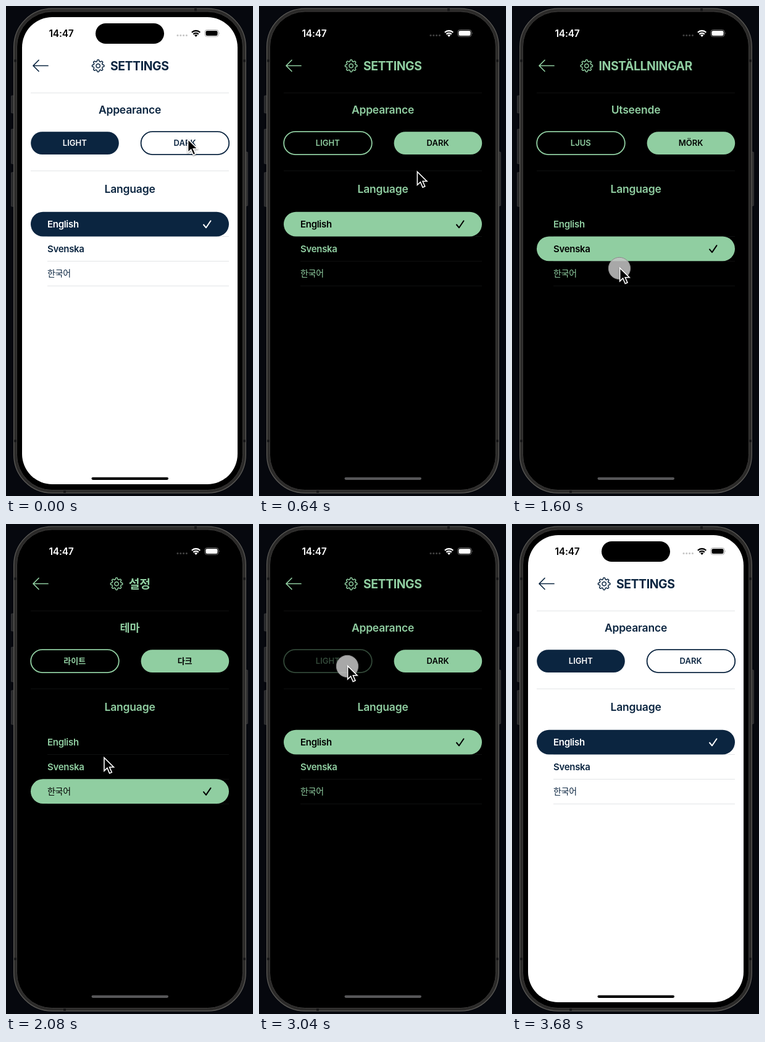
An HTML page that plays this animation: 400 by 792 pixels, repeating every 3.76 s.

```html
<!DOCTYPE html>
<html lang="en">
<head>
<meta charset="utf-8">
<title>Settings</title>
<style>
html, body { margin: 0; width: 100%; height: 100%; overflow: hidden; background: #06080e; }
svg { display: block; width: 400px; height: 792px; }
text { font: 600 15px Inter, "Noto Sans CJK KR", "Noto Sans CJK", sans-serif; fill: var(--fg); }
.light { --fg: #0b2540; --bg: #fff; --on: #fff; --line: #e3e5e7; --bar: #000; --dots: #c6c6c6; --rim: #a6a6a6; }
.dark { --fg: #90cea1; --bg: #000; --on: #000; --line: #0f1010; --bar: #565658; --dots: #414141; --rim: #707070; }
.status { --ink: #000; fill: var(--ink); }
.dark .status { --ink: #fff; }
.status text { fill: var(--ink); font-size: 15.5px; letter-spacing: -.2px; }
.icon { fill: none; stroke: var(--fg); stroke-linecap: round; stroke-linejoin: round; }
.lines { stroke: var(--line); }
.mid { text-anchor: middle; font-size: 17.5px; letter-spacing: -.2px; }
#title { font-size: 19.4px; font-weight: 700; letter-spacing: -.4px; }
.btn rect { fill: none; stroke: var(--fg); stroke-width: 1.8; }
.btn text { text-anchor: middle; font-size: 13px; }
.btn.on rect { fill: var(--fg); stroke: none; }
.btn.on text, .row.on { fill: var(--on); }
.row { letter-spacing: -.3px; }
.row:lang(ko) { font-size: 14px; font-weight: 500; }
</style>
</head>
<body>
<svg viewBox="0 0 400 792">
  <g fill="#2a2a2b" stroke="#404042" stroke-width=".7">
    <rect x="8.5" y="145" width="6" height="28" rx="1"/>
    <rect x="8.5" y="199" width="6" height="56" rx="1"/>
    <rect x="8.5" y="269" width="6" height="55" rx="1"/>
    <rect x="386" y="236" width="5.5" height="87" rx="1"/>
  </g>
  <rect x="12.7" y="4.2" width="375.6" height="783" rx="62" fill="#2b2a29" stroke="#5b5a57" stroke-width="1.3"/>
  <path d="M13 88.5h5M383 88.5h5M13 703h5M383 703h5M307 4v5M95 782v5" stroke="#171718" stroke-width="4"/>
  <rect x="17.5" y="9" width="366" height="773.5" rx="57" stroke="#3c3b3a"/>

  <g id="app" class="light">
    <rect x="26" y="18" width="349" height="755" rx="49" fill="var(--bg)"/>
    <rect x="145" y="28" width="111" height="33" rx="16.5"/>
    <g class="status">
      <text x="69.5" y="49.5">14:47</text>
      <path d="M278 47.5h14.5" fill="none" stroke="var(--dots)" stroke-width="3.2" stroke-linecap="round" stroke-dasharray="0 4.8"/>
      <path d="M300.9 42.7a9.6 9.6 0 0 1 13.4 0M303.4 45.6a6 6 0 0 1 8.4 0" fill="none" stroke="var(--ink)" stroke-width="2.3"/>
      <path d="M307.6 50l-2.5-2.7a3.6 3.6 0 0 1 5 0z"/>
      <rect x="322" y="38.5" width="22" height="11" rx="3.6" fill="none" stroke="var(--rim)"/>
      <rect x="323.5" y="40" width="19" height="8" rx="2.3"/>
      <path d="M345.3 42.3q1.4 1.7 0 3.4z" fill="var(--rim)"/>
    </g>
    <path class="icon" stroke-width="1.7" d="M68 96.5H44M53 87.5l-9 9 9 9"/>
    <g id="gear" class="icon" stroke-width="1.5"><path/><circle r="3.2"/></g>
    <text id="title" class="mid" x="216.2" y="104"></text>
    <path class="lines" d="M40 140.5H361M40 266.5H361M67 372.5H361M67 412.5H361M67 452.5H361"/>
    <text id="look" class="mid" x="200.5" y="173.7"></text>
    <g id="day" class="btn">
      <rect x="40.2" y="203.2" width="142.6" height="36.9" rx="18.4"/>
      <text x="111.3" y="226.3"></text>
    </g>
    <g id="night" class="btn">
      <rect x="218.6" y="203.2" width="142.6" height="36.9" rx="18.4"/>
      <text x="289.6" y="226.3"></text>
    </g>
    <text class="mid" x="200.5" y="301.7">Language</text>
    <g id="pick">
      <rect x="40" y="332.7" width="321" height="39.8" rx="19.9" fill="var(--fg)"/>
      <path class="icon" style="stroke:var(--on)" stroke-width="2" d="M320 353.5l4 4.8 7.5-11"/>
    </g>
    <text class="row" x="67" y="358">English</text>
    <text class="row" x="67" y="398">Svenska</text>
    <text class="row" x="67" y="437" lang="ko">한국어</text>
    <rect x="138.5" y="761.7" width="124.5" height="4.3" rx="2.15" fill="var(--bar)"/>
  </g>

  <g id="mouse">
    <circle id="tap" cy="2" r="17.7" fill="#c4c4c4" fill-opacity=".86" stroke="#8c8c8c"/>
    <path d="M.6 1.4V22.8L5.6 18.1 9.3 26.7 13 25.1 9.3 16.8H16.1Z" stroke="#fff" stroke-width="1.6" style="filter:drop-shadow(0 1px 1px #0007)"/>
  </g>
</svg>
<script>
const LOOP = 3760, STEP = 80;
const DARK = 320, SWEDISH = 960, KOREAN = 1680, ENGLISH = 2320, LIGHT = 3120;
const $ = id => document.getElementById(id);
const rows = document.querySelectorAll('.row');

const words = [
  { title: 'SETTINGS', look: 'Appearance', day: 'LIGHT', night: 'DARK' },
  { title: 'INSTÄLLNINGAR', look: 'Utseende', day: 'LJUS', night: 'MÖRK' },
  { title: '설정', look: '테마', day: '라이트', night: '다크' }
];

// Pointer moves: departure, arrival, place
const moves = [
  [480, 720, 208, 332],
  [800, 880, 174, 378],
  [1040, 1200, 174, 413],
  [1360, 1520, 174, 422],
  [1760, 2160, 149.5, 350.5],
  [2400, 2560, 174, 273],
  [2560, 2720, 143, 228],
  [3520, 3600, 318, 370]
];

const within = (t, a, b) => t >= a && t < b;
const clamp = (v, lo, hi) => Math.max(lo, Math.min(hi, v));
const theme = dark => dark ? 'dark' : 'light';

function pointer(t) {
  let x = 294, y = 214;
  for (const [from, to, nx, ny] of moves) {
    const p = clamp((t - from) / (to - from), 0, 1) ** 2;
    x += (nx - x) * p;
    y += (ny - y) * p;
  }
  return `translate(${x} ${y})`;
}

// Quick dip on press, slower return
function fade(t, low) {
  const d = t - low;
  return Math.min(1, .2 + .8 * Math.abs(d) / (d < 0 ? 160 : 320));
}

function gearPath() {
  const pts = [];
  for (let i = 0; i < 128; i++) {
    const a = i / 64 * Math.PI;
    const r = 8.5 + 1.2 * clamp(1.7 * Math.cos(8 * a), -1, 1);
    pts.push((r * Math.sin(a)).toFixed(2) + ' ' + (-r * Math.cos(a)).toFixed(2));
  }
  return 'M' + pts.join('L') + 'Z';
}

function button(id, label, dark, on, opacity) {
  const g = $(id);
  g.setAttribute('class', `btn ${theme(dark)}${on ? ' on' : ''}`);
  g.setAttribute('opacity', opacity);
  g.lastElementChild.textContent = label;
}

function draw(now) {
  const t = Math.floor(now % LOOP / STEP) * STEP;
  const lang = within(t, SWEDISH, KOREAN) ? 1 : within(t, KOREAN, ENGLISH) ? 2 : 0;
  const w = words[lang];

  $('app').setAttribute('class', theme(within(t, DARK, LIGHT)));
  $('title').textContent = w.title;
  $('look').textContent = w.look;
  const gearX = 196.5 - $('title').getComputedTextLength() / 2;
  $('gear').setAttribute('transform', `translate(${gearX} 96.7)`);

  // A pressed button takes its new style one step late
  const dayOut = within(t, DARK, LIGHT + STEP);
  const nightOn = within(t, DARK + STEP, LIGHT);
  button('day', w.day, dayOut, !dayOut, fade(t, LIGHT - 50));
  button('night', w.night, nightOn, nightOn, fade(t, DARK));

  $('pick').setAttribute('transform', `translate(0 ${lang * 39.8})`);
  rows.forEach((r, i) => r.classList.toggle('on', i === lang));

  const tapped = [DARK, SWEDISH, KOREAN, ENGLISH, LIGHT].includes(t + STEP);
  $('mouse').setAttribute('transform', pointer(t));
  $('mouse').style.display = t < LOOP - STEP ? '' : 'none';
  $('tap').style.display = tapped ? '' : 'none';
}

$('gear').firstElementChild.setAttribute('d', gearPath());
const start = performance.now();
(function tick() {
  draw(performance.now() - start);
  requestAnimationFrame(tick);
})();
</script>
</body>
</html>
```
